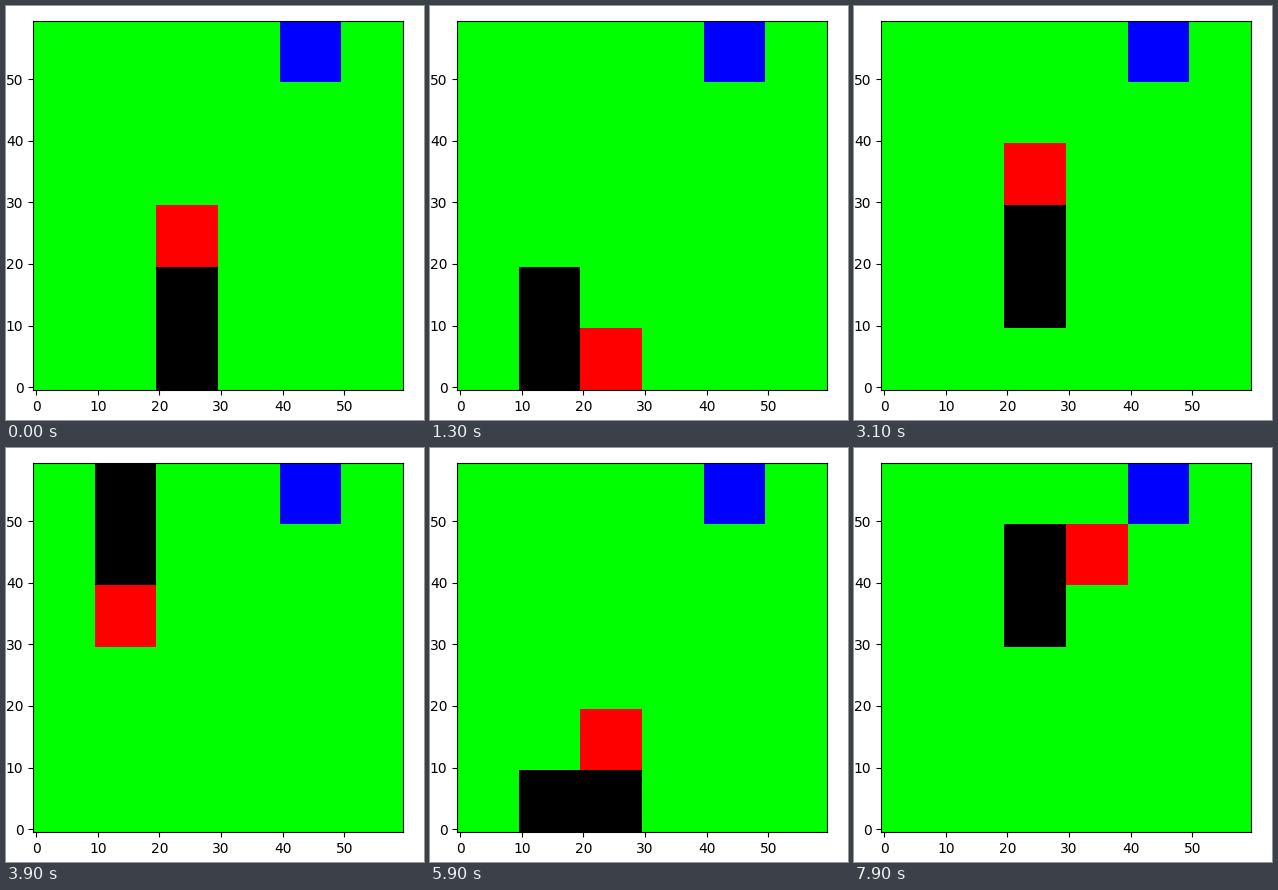
Animation, 418 px wide and 414 px high, one loop 8 s. Source, as a matplotlib script:

```python
import numpy as np
import matplotlib.pyplot as plt
from matplotlib.animation import FuncAnimation

W, H, DPI = 418, 414, 100
FRAMES, INTERVAL = 80, 100
CELL, GRID = 10, 6

GREEN = (0, 255, 0)
BLUE = (0, 0, 255)
RED = (255, 0, 0)
BLACK = (0, 0, 0)

FOOD = (4, 5)
# Closed route of the snake's head as (column, row)
ROUTE = ([(2, r) for r in range(5)] + [(3, 4), (3, 5), (2, 5)]
         + [(1, r) for r in range(5, -1, -1)])
START = 2
HOLDS = (2, 18, 33, 45, 61, 73, 76)  # ticks without a move
CATCH_UP = 74                        # tick with a double move


def head_index(tick):
    held = sum(h <= tick for h in HOLDS)
    return START + tick - held + (tick >= CATCH_UP)


def board(tick):
    img = np.full((GRID * CELL, GRID * CELL, 3), GREEN, dtype=np.uint8)

    def fill(cell, color):
        x, y = cell[0] * CELL, cell[1] * CELL
        img[y:y + CELL, x:x + CELL] = color

    head = head_index(tick)
    fill(FOOD, BLUE)
    for back, color in ((2, BLACK), (1, BLACK), (0, RED)):
        fill(ROUTE[(head - back) % len(ROUTE)], color)
    return img


# The tiny margin keeps the pixel size from rounding down
fig = plt.figure(figsize=((W + 1e-3) / DPI, (H + 1e-3) / DPI), dpi=DPI,
                 facecolor="white")
LEFT, BOTTOM, SIDE = 27.2, 29.8, 369.6
ax = fig.add_axes([LEFT / W, BOTTOM / H, SIDE / W, SIDE / H])
picture = ax.imshow(board(0), origin="lower", interpolation="nearest",
                    aspect="auto")
ax.set_xticks(range(0, 60, 10))
ax.set_yticks(range(0, 60, 10))


def update(tick):
    picture.set_data(board(tick))
    return (picture,)


anim = FuncAnimation(fig, update, frames=FRAMES, interval=INTERVAL,
                     repeat=True, repeat_delay=0)
plt.show()
```
